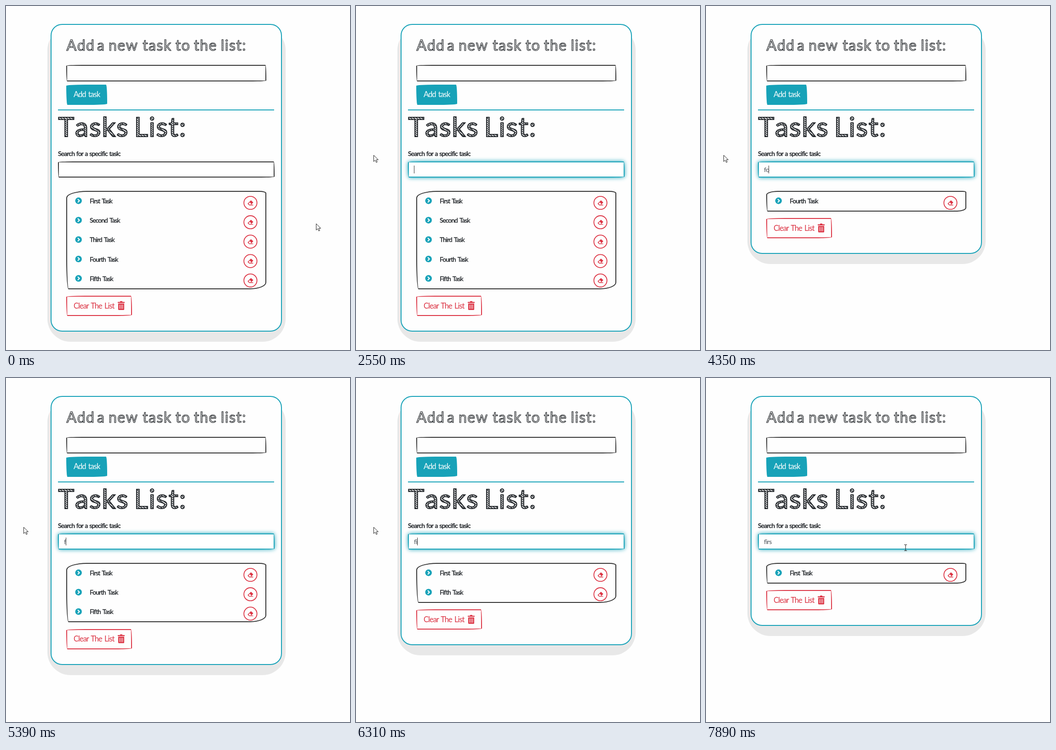
These frames come from a looping animation (748x748 px, 8000 ms). An HTML page:

```html
<!DOCTYPE html>
<html lang="en">
<head>
<meta charset="utf-8">
<title>Tasks list</title>
<style>
  html, body { margin: 0; width: 100%; height: 100%; overflow: hidden; background: #fefefe; }
  #stage { position: relative; width: 748px; height: 748px; overflow: hidden; --teal: #17a2b8; --red: #dc3545; }
  #stage > * { position: absolute; box-sizing: border-box; }
  #shadow { left: 90px; top: 46px; width: 518px; border-radius: 50px; background: #e8e8e8; }
  #card { left: 97px; top: 39px; width: 503px; border: 2px solid var(--teal); border-radius: 25px; background: #fefefe; }
  .rough { border: 2px solid #333; border-radius: 255px 15px 225px 15px / 15px 225px 15px 255px; }
  #newTask { left: 131px; top: 128px; width: 435px; height: 36px; }
  #add { left: 131px; top: 171px; width: 89px; height: 44px; background: var(--teal); border-color: var(--teal); }
  #rule { left: 113px; top: 225px; width: 470px; height: 2px; background: var(--teal); }
  #search { left: 113px; top: 338px; width: 471px; height: 35px; background: #fff; }
  #list { left: 131px; top: 402px; width: 435px; border: 2px solid #333; border-radius: 45px 15px 35px 5px / 15px 5px 15px 65px; }
  #clear { left: 131px; width: 143px; height: 44px; border-color: var(--red); }
  svg { left: 0; top: 0; }
  text { font-family: Lato, "Open Sans", sans-serif; fill: #212529; }
  .head { font-kerning: none; stroke: #212529; }
  .h1 { font-size: 32px; letter-spacing: 1.5px; stroke-width: 1.1px; fill: url(#fine); }
  .h2 { font-size: 59px; letter-spacing: 1.7px; stroke-width: 2px; fill: url(#bold); }
  .item { font-size: 14px; letter-spacing: -1.05px; word-spacing: 2px; stroke: #212529; stroke-width: .35px; }
  .label { letter-spacing: -.85px; word-spacing: 1px; stroke-width: .45px; }
  .typed { font-size: 14px; letter-spacing: -.7px; fill: #495057; }
  .button { font-size: 16.5px; letter-spacing: -1px; word-spacing: 2px; }
</style>
</head>
<body>
<div id="stage">
  <div id="shadow"></div>
  <div id="card"></div>
  <div id="newTask" class="rough"></div>
  <div id="add" class="rough"></div>
  <div id="rule"></div>
  <div id="search" class="rough"></div>
  <div id="list"></div>
  <div id="clear" class="rough"></div>
  <svg width="748" height="748" viewBox="0 0 748 748">
    <defs>
      <pattern id="fine" width="3" height="3" patternUnits="userSpaceOnUse" patternTransform="rotate(-38)">
        <rect width="3" height="3" fill="#fefefe"/><rect width="3" height="1" fill="#777"/>
      </pattern>
      <pattern id="bold" width="3.6" height="3.6" patternUnits="userSpaceOnUse" patternTransform="rotate(36)">
        <rect width="4" height="4" fill="#fefefe"/><rect width="4" height="1.7" fill="#212529"/>
      </pattern>
      <g id="icons">
        <circle cx="157.7" cy="423.5" r="7.2" fill="#17a2b8"/>
        <path d="M156 419.9l3.6 3.6-3.6 3.6" fill="none" stroke="#fff" stroke-width="2.1"/>
        <circle cx="531.5" cy="428" r="14.2" fill="none" stroke="#dc3545" stroke-width="1.8"/>
        <path transform="translate(531.5 428)" fill="#dc3545" fill-rule="evenodd"
          d="M-6.2 1.8L1.2-5.4 6.2-.8 1.6 4H6V5.4H-2.7ZM-4.1 1.8L-1.7 4H.1L1.7 2.3-1.3-.9Z"/>
      </g>
    </defs>
    <g id="heads"></g>
    <text class="button" x="147" y="198" style="fill:#fff">Add task</text>
    <text class="item label" x="113" y="325.5">Search for a specific task:</text>
    <text id="typed" class="typed" x="126" y="360.5"></text>
    <rect id="caret" y="347" width="1" height="17" fill="#333"/>
    <g id="rows"></g>
    <g id="clearLabel">
      <text class="button" x="147" y="657.5" style="fill:#dc3545">Clear The List</text>
      <path fill="#dc3545" fill-rule="evenodd"
        d="M243 643.5h4.5l1-1.7h4l1 1.7h4.5v2.2h-15ZM244 647h13v12.5q0 1.5-1.5 1.5h-10q-1.5 0-1.5-1.5ZM246.7 649.3v9.2h1.2v-9.2ZM249.9 649.3v9.2h1.2v-9.2ZM253.1 649.3v9.2h1.2v-9.2Z"/>
    </g>
    <path id="arrow" d="M.5.5V14.2L3.7 11.2 6 16.2 8.2 15.2 6 10.3H10.4Z" fill="#fff" stroke="#222" stroke-width="1"/>
    <path id="beam" d="M-3-6.5H-.8L0-5.9.8-6.5H3M0-6V6M-3 6.5H-.8L0 5.9.8 6.5H3" fill="none" stroke="#222" stroke-width="1.1"/>
  </svg>
</div>
<script>
const LOOP = 8000, ROW = 42.2;
const $ = id => document.getElementById(id);

// Every track is a list of [start time, value...].
const pointer = [
  [0, 'arrow', 674, 473], [650, 'arrow', 585, 452], [780, 'arrow', 414, 414],
  [930, 'beam', 184, 361], [1090, 'beam', 174, 357], [1220, 'beam', 170, 355],
  [1730, 'beam', 126, 347], [1880, 'arrow', 44, 326], [2030, 'arrow', 38, 324],
  [7620, 'arrow', 45, 320], [7740, 'arrow', 69, 311], [7890, 'beam', 434, 369]
];
const typing = [
  [0, '', 126], [3300, 'f', 130], [4220, 'fo', 136], [5260, 'f', 130],
  [6050, 'fi', 133], [6430, 'fir', 138], [7120, 'firs', 143]
];
const filter = [
  [0, ''], [3460, 'f'], [4350, 'fo'], [5390, 'f'], [6310, 'fi'], [6560, 'fir']
];
const caretOn = [
  [0, 0], [1590, 1], [2030, 0], [2550, 1], [3050, 0], [3300, 1], [3840, 0], [4220, 1],
  [4730, 0], [5260, 1], [5800, 0], [6050, 1], [6980, 0], [7120, 1], [7620, 0]
];
const focus = [[0, 0], [1470, .5], [1590, 1]];

const at = (track, t) => track.findLast(step => step[0] <= t).slice(1);

function add(parent, tag, attrs, text = '') {
  const el = document.createElementNS('http://www.w3.org/2000/svg', tag);
  for (const name in attrs) el.setAttribute(name, attrs[name]);
  el.textContent = text;
  return parent.appendChild(el);
}

const words = (cls, y, list) => list.forEach(([x, word]) =>
  add($('heads'), 'text', { class: 'head ' + cls, x, y }, word));
words('h1', 97, [[131.5, 'Add'], [198, 'a'], [223, 'new'], [297, 'task'],
  [368.5, 'to'], [408.5, 'the'], [467, 'list:']]);
words('h2', 284, [[113.5, 'Tasks'], [278.5, 'List:']]);

const rows = ['First', 'Second', 'Third', 'Fourth', 'Fifth'].map(name => {
  const el = add($('rows'), 'g', {});
  add(el, 'use', { href: '#icons' });
  add(el, 'text', { class: 'item', x: 182, y: 429 }, name + ' Task');
  return { el, key: name.toLowerCase() };
});

function layout(query) {
  let count = 0;
  for (const { el, key } of rows) {
    const shown = key.includes(query);
    el.style.display = shown ? '' : 'none';
    if (shown) el.setAttribute('transform', `translate(0 ${ROW * count++})`);
  }
  const lift = ROW * (rows.length - count);
  $('card').style.height = 669 - lift + 'px';
  $('shadow').style.height = 684 - lift + 'px';
  $('list').style.height = 213.5 - lift + 'px';
  $('clear').style.top = 630 - lift + 'px';
  $('clearLabel').setAttribute('transform', `translate(0 ${-lift})`);
}

function draw(t) {
  const [shape, x, y] = at(pointer, t);
  for (const id of ['arrow', 'beam']) $(id).style.display = id === shape ? '' : 'none';
  $(shape).setAttribute('transform', `translate(${x} ${y})`);

  const [text, caretX] = at(typing, t);
  $('typed').textContent = text;
  $('caret').setAttribute('x', caretX);
  $('caret').style.display = at(caretOn, t)[0] ? '' : 'none';

  const [glow] = at(focus, t);
  $('search').style.borderColor = glow ? '#17a2b8' : '#333';
  $('search').style.boxShadow = glow ? `0 0 10px rgba(23,162,184,${glow})` : 'none';

  layout(at(filter, t)[0]);
}

const start = performance.now();
function tick() {
  draw((performance.now() - start) % LOOP);
  requestAnimationFrame(tick);
}
tick();
</script>
</body>
</html>
```
